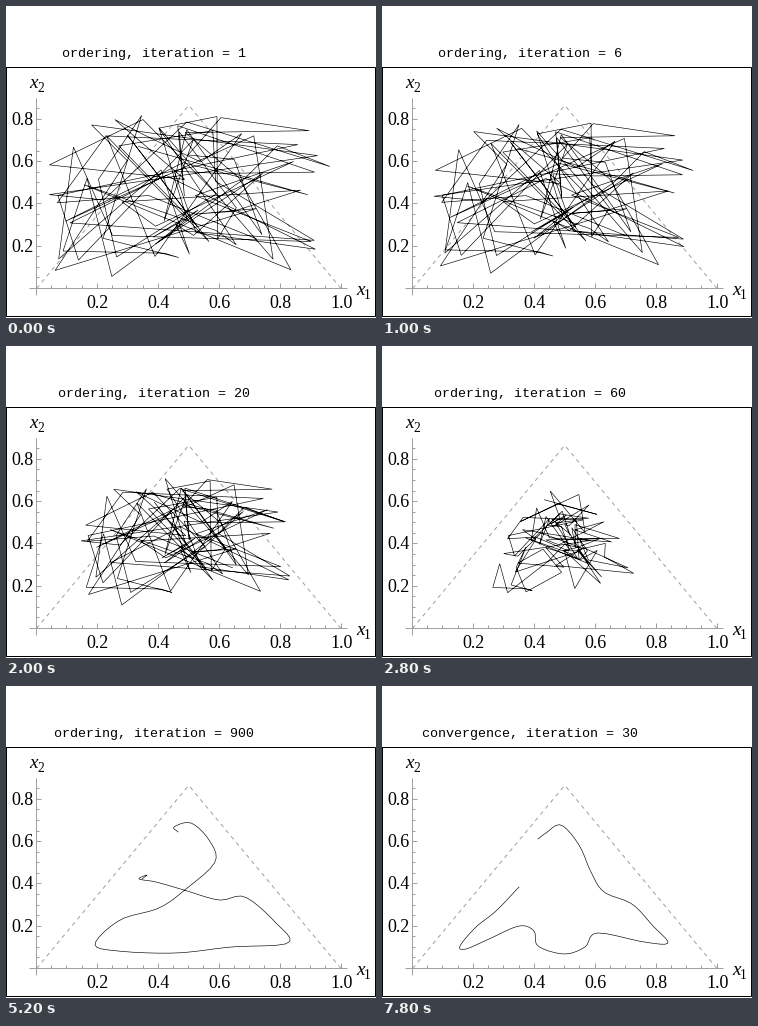
A matplotlib script for the animation above (8 s loop, 370x312 px).

```python
import numpy as np
import matplotlib.pyplot as plt
from matplotlib.animation import FuncAnimation

W, H, DPI = 370, 312, 100
PT = 72 / DPI
NODES = 100
GRAY = "#a0a0a0"
CENTER = np.array([180.0, 191.0])
rng = np.random.default_rng(12)

# Schedule of displayed steps: ordering phase, then convergence phase
STEPS = [("ordering", n) for n in
         [*range(1, 11), *range(20, 101, 10), *range(200, 1001, 100)]]
STEPS += [("convergence", n) for n in [*range(1, 11), 20, 30]]


def spline(points):
    """Catmull-Rom curve through the points, sampled at the nodes."""
    p = np.array(points, float)
    p = np.vstack([2 * p[0] - p[1], p, 2 * p[-1] - p[-2]])
    s = np.linspace(0, len(points) - 1, NODES)
    i = np.minimum(s.astype(int), len(points) - 2)
    t = (s - i)[:, None]
    a, b, c, d = p[i], p[i + 1], p[i + 2], p[i + 3]
    return b + t / 2 * (c - a + t * (2 * a - 5 * b + 4 * c - d
                                     + t * (3 * b - 3 * c + d - a)))


def smooth(chain, passes):
    chain = chain.copy()
    for _ in range(passes):
        chain[1:-1] = (chain[:-2] + 2 * chain[1:-1] + chain[2:]) / 4
    return chain


# Random starting weights, as offsets from the middle of the cloud
SCATTER = np.column_stack([40 + 289 * rng.beta(1.1, 1.1, NODES),
                           101 + 181 * rng.beta(1.5, 1.5, NODES)]) - CENTER

# The chain after ordering (still twisted) and after convergence
TWIST = spline([
    (172, 146), (168, 141), (185, 137), (203, 154), (209, 176), (180, 203),
    (153, 222), (114, 234), (89, 258), (112, 265), (170, 267), (225, 261),
    (282, 257), (270, 237), (239, 211), (213, 214), (178, 204), (150, 196),
    (133, 193), (141, 189), (136, 193)])
FINAL = spline([
    (156, 153), (164, 147), (179, 139), (197, 159), (209, 186), (222, 206),
    (250, 218), (271, 240), (286, 257), (262, 256), (215, 247), (203, 261),
    (182, 268), (156, 260), (152, 245), (137, 240), (107, 253), (84, 263),
    (78, 260), (94, 241), (114, 225), (137, 201)])


def ordering(n):
    """The scatter dies out while the chain unfolds from the middle."""
    m = n - 1
    scatter = np.exp(-0.015 * m - 0.00008 * m * m)
    late = np.log(max(n, 100) / 100) / np.log(9)
    early = min(m / 99, 1)
    grown = early * np.array([0.58, 0.8])
    unfold = grown + (1 - grown) * min(late, 1)
    return CENTER + unfold * (TWIST - CENTER) + scatter * SCATTER


def convergence(n):
    left = 1 - np.log(n) / np.log(30)
    return FINAL + left * (smooth(FINAL, 5) - FINAL)


fig = plt.figure(figsize=(W / DPI, H / DPI), dpi=DPI, facecolor="white")
ax = fig.add_axes([0, 0, 1, 1])
ax.set_xlim(0, W)
ax.set_ylim(H, 0)
ax.axis("off")


def px(u):
    return 30.5 + 304.5 * u


def py(v):
    return 282.5 - 211.5 * v


def line(xs, ys, color, width=1.0, **kw):
    return ax.plot(xs, ys, color=color, lw=width * PT, snap=False,
                   clip_on=False, **kw)[0]


def label(x, y, s, size, ha="center", style="normal"):
    ax.text(x, y, s, fontsize=size * PT, family="Liberation Serif",
            style=style, ha=ha, va="baseline")


line([0.5, 369.5, 369.5, 0.5, 0.5], [61.5, 61.5, 310.5, 310.5, 61.5], "black",
     solid_joinstyle="miter")
line([24, 341], [282.5, 282.5], GRAY)
line([30.5, 30.5], [93, 289], GRAY)

for k in range(1, 21):
    size = 2.5 if k % 4 else 4.5
    x = np.floor(px(k / 20)) + 0.5
    y = np.floor(py(k / 20)) + 0.5
    line([x, x], [282.5, 282.5 - size], GRAY)
    if k <= 17:
        line([30.5, 30.5 + size], [y, y], GRAY)
    if k % 4 == 0:
        label(x, 302, f"{k / 20:.1f}", 18)
        if k < 20:
            label(27.5, y + 5.4, f"{k / 20:.1f}", 18, ha="right")

for x, y, sub in [(350, 289, "1"), (23, 82, "2")]:
    label(x, y, "x", 19, ha="left", style="italic")
    label(x + 8, y + 4, sub, 13.5, ha="left")

for foot in (0, 1):
    line([px(foot), px(0.5)], [py(0), py(np.sqrt(3) / 2)], GRAY,
         dashes=(4, 4), dash_capstyle="butt")

net = line([], [], "black", 0.62, solid_joinstyle="bevel")
title = ax.text(0, 51, "", fontsize=13.333 * PT, family="Liberation Mono",
                ha="left", va="baseline")


def draw(i):
    phase, n = STEPS[i]
    chain = ordering(n) if phase == "ordering" else convergence(n)
    net.set_data(chain[:, 0], chain[:, 1])
    caption = f"{phase}, iteration = {n}"
    title.set_text(caption)
    title.set_x(148 - 4 * len(caption))
    return net, title


anim = FuncAnimation(fig, draw, frames=len(STEPS), interval=200,
                     repeat=True, repeat_delay=0, blit=False)
plt.show()
```
